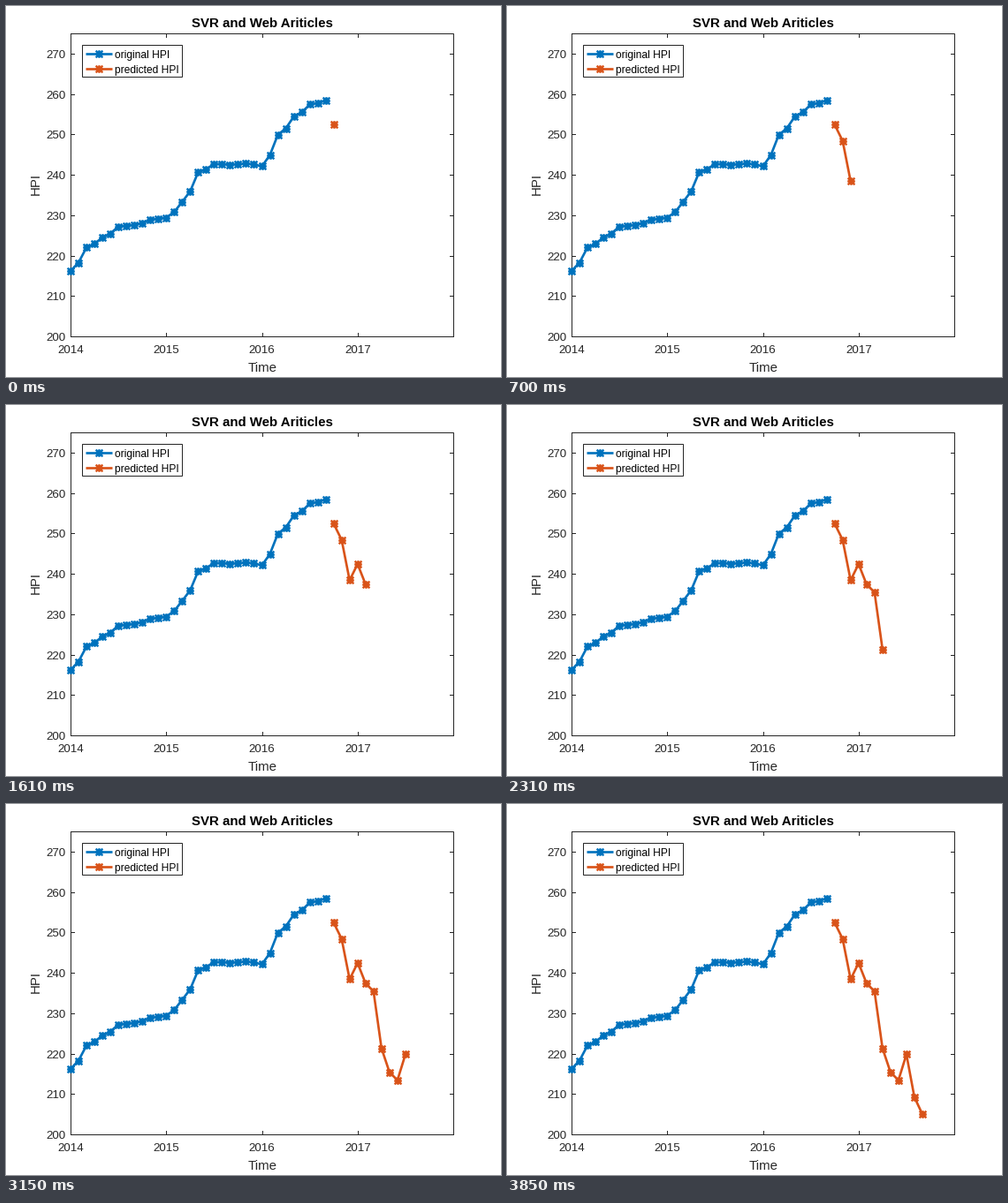
These frames come from a looping animation (560x420 px, 4.2 s). A matplotlib script:

```python
import matplotlib.pyplot as plt
import numpy as np
from matplotlib.animation import FuncAnimation
from matplotlib.markers import MarkerStyle
from matplotlib.path import Path

W, H, DPI = 560, 420, 100
LEFT, RIGHT, TOP, BOTTOM = 73, 506, 31, 374
BLUE, ORANGE, INK = "#0072BD", "#D95319", "#262626"
TICK = 4

# Index level at every second month; the months between are eased
LEVELS = [216.2, 222, 224.5, 227.2, 227.6, 228.9, 229.4, 233.3, 240.6,
          242.7, 242.5, 242.8, 242.1, 249.9, 254.4, 257.4, 258.4]
# Turning points of the forecast, one per month
FORECAST = [252.4, 248.4, 238.4, 242.4, 237.4, 235.4,
            221.3, 215.4, 213.4, 219.8, 209.2, 205]

plt.rcParams["font.family"] = "Liberation Sans"
plt.rcParams["toolbar"] = "None"

fig = plt.figure(figsize=(W / DPI, H / DPI), dpi=DPI, facecolor="white")
stage = fig.add_axes([0, 0, 1, 1])
stage.set_xlim(0, W)
stage.set_ylim(H, 0)
stage.axis("off")


def pt(pixels):
    return pixels * 72 / DPI


def month_x(month):
    return LEFT + (RIGHT - LEFT) * month / 48


def value_y(value):
    return BOTTOM - (BOTTOM - TOP) * (value - 200) / 75


def eased(levels, step=2, power=1.5):
    """Fill in `step` months per level, starting each rise slowly."""
    pos = np.arange((len(levels) - 1) * step + 1) / step
    start = np.floor(pos)
    return np.interp(start + (pos - start) ** power, range(len(levels)), levels)


def asterisk():
    d = 0.9
    arms = [(-1, 0), (1, 0), (0, -1), (0, 1), (-d, -d), (d, d), (-d, d), (d, -d)]
    codes = [Path.MOVETO, Path.LINETO] * 4
    return MarkerStyle(Path(arms, codes), fillstyle="none", capstyle="butt")


def series(xs, ys, color, **kw):
    line, = stage.plot(xs, ys, color=color, lw=pt(2.67), marker=asterisk(),
                       ms=pt(8.6), mew=pt(2.4), solid_joinstyle="round",
                       solid_capstyle="butt", **kw)
    return line


def tick(x, y, dx, dy):
    stage.plot([x, x + dx * TICK], [y, y + dy * TICK], color=INK, lw=pt(1), zorder=1)


def label(x, y, text, size, color=INK, **kw):
    stage.text(x, y, text, fontsize=pt(size), color=color, va="baseline", **kw)


def box(x0, y0, x1, y1, fill, z):
    stage.add_patch(plt.Rectangle((x0, y0), x1 - x0, y1 - y0, facecolor=fill,
                                  edgecolor=INK, lw=pt(1), zorder=z))


# Axes box, ticks and labels
box(LEFT, TOP, RIGHT, BOTTOM, "none", 1)
for year in range(2014, 2018):
    x = month_x((year - 2014) * 12)
    tick(x, BOTTOM, 0, -1)
    tick(x, TOP, 0, 1)
    label(x, 393, str(year), 13.33, ha="center")
for value in range(200, 280, 10):
    y = value_y(value)
    tick(LEFT, y, 1, 0)
    tick(RIGHT, y, -1, 0)
    label(67.5, round(y + 5.1), str(value), 13.33, ha="right")

label(290, 24, "SVR and Web Ariticles", 15, "black", ha="center", weight="bold")
label(290, 414, "Time", 15, ha="center")
label(38, 201.5, "HPI", 15, ha="center", rotation=90, rotation_mode="anchor")

# Data
past = eased(LEVELS)
series(month_x(np.arange(len(past))), value_y(past), BLUE, zorder=2)
pred_x = month_x(len(past) + np.arange(len(FORECAST)))
pred_y = value_y(np.array(FORECAST))
forecast = series([], [], ORANGE, zorder=3)

# Legend
box(86, 44, 199, 80, "white", 4)
for y, color, name in [(54, BLUE, "original HPI"), (71, ORANGE, "predicted HPI")]:
    series([90, 105, 120], [y] * 3, color, markevery=[1], zorder=5)
    label(123, y + 5, name, 12, "black", zorder=5)


def update(i):
    forecast.set_data(pred_x[:i + 1], pred_y[:i + 1])
    return [forecast]


anim = FuncAnimation(fig, update, frames=len(FORECAST), interval=350,
                     repeat=True, repeat_delay=0, blit=False)
plt.show()
```
